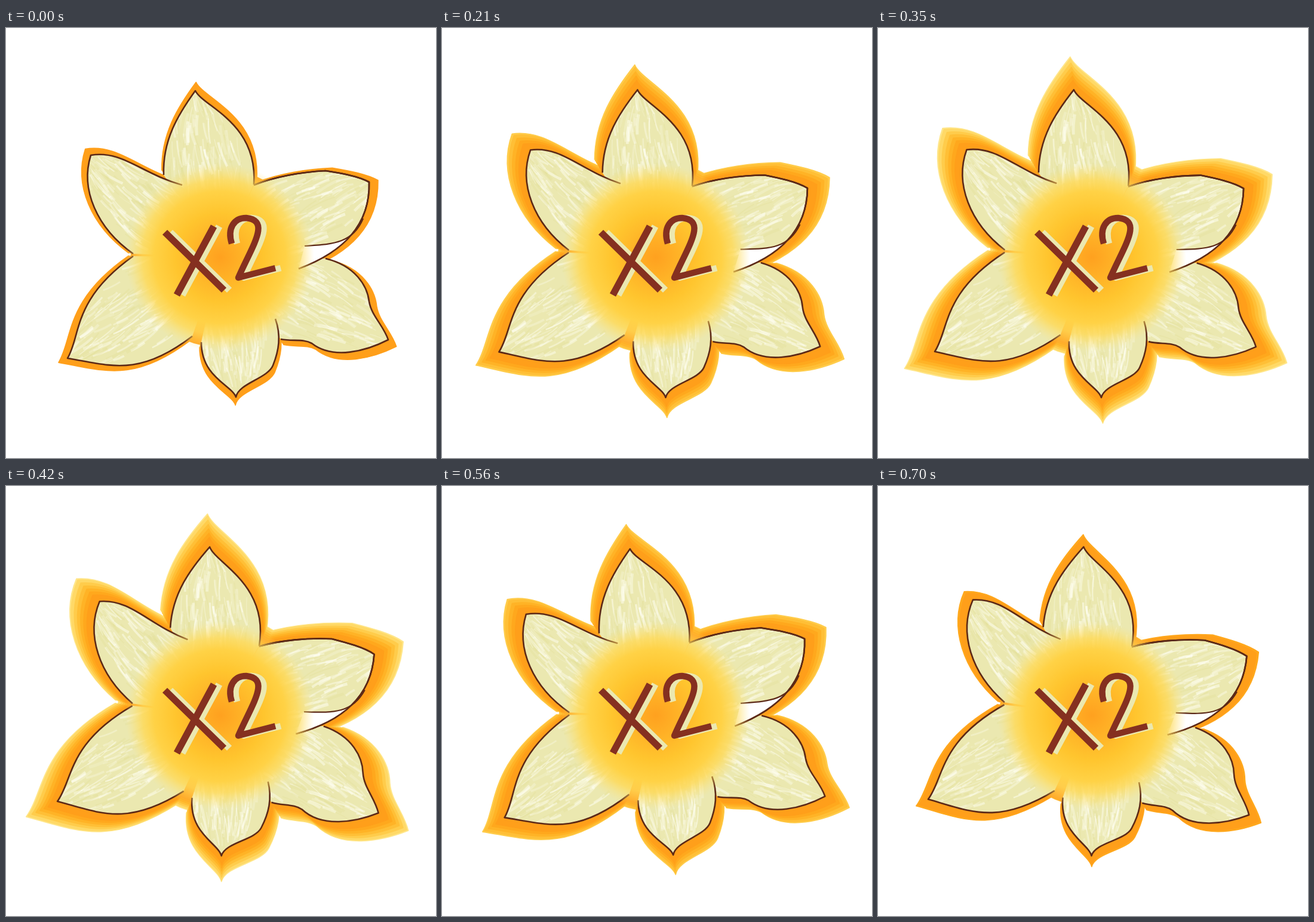
An HTML page with a canvas that plays this animation: 720 px wide and 720 px high, repeating every 770 ms.

```html
<!DOCTYPE html>
<html lang="en">
<head>
<meta charset="utf-8">
<title>Flower X2</title>
<style>
  html, body { margin: 0; height: 100%; overflow: hidden; background: #fff; }
  canvas { display: block; }
</style>
</head>
<body>
<canvas id="stage" width="720" height="720"></canvas>
<script>
const ctx = document.getElementById('stage').getContext('2d');
const STEP = 70, STEPS = 11;
const HUB = { x: 358, y: 384 };
const BROWN = '#5c2917', RED = '#853020', CREAM = '#ebe8b0';

const petals = [
  petal(317, 105, 'M264 246C262 188 288 145 317 105C330 132 422 158 415 262'),
  petal(142, 213, 'M213 378C152 335 124 270 142 213C194 204 227 244 295 263'),
  petal(640, 522, 'M535 386C585 398 605 432 608 458C612 482 632 498 640 522C603 541 548 556 512 528C498 520 480 525 460 521'),
  petal(385, 618, 'M451 487C461 515 457 540 447 565C438 587 389 595 385 618C378 598 327 585 327 526'),
  petal(103, 553, 'M213 382C110 455 126 515 103 553C175 565 222 585 312 516'),
  petal(608, 258, 'M415 263C450 249 495 241 535 239C560 243 590 248 608 258C610 330 565 375 490 403')
];
const fold = 'M598 319C580 362 545 362 500 365';
const foldLine = new Path2D(fold);
const flap = new Path2D(fold + 'L490 403C540 384 580 356 598 319Z');
const cross = new Path2D('M266 342L365 439M348 332L286 447');
const two = new Path2D('M378 361C370 335 382 318 402 318C444 322 412 365 389 418L451 402');

function petal(x, y, outline) {
  return { x, y, edge: new Path2D(outline), body: new Path2D(`${outline}L${HUB.x} ${HUB.y}Z`) };
}

// The flower sways every four steps, a little wider each time
function swayAt(step) {
  return (2.15 + 0.12 * step) * (1 - Math.cos(step * Math.PI / 2)) - 0.06 * step;
}

// The halo swells, holds and shrinks
function reachAt(step) {
  return Math.min(0.19, 0.053 + 0.031 * step, 0.42 - 0.0345 * step);
}

function randomizer(seed) {
  return () => (seed = seed * 16807 % 2147483647) / 2147483647;
}

function brush(path, color, width) {
  ctx.strokeStyle = color;
  ctx.lineWidth = width;
  ctx.stroke(path);
}

function turn(degrees) {
  ctx.translate(360, 360);
  ctx.rotate(degrees * Math.PI / 180);
  ctx.translate(-360, -360);
}

function drawSilhouette(color, grow, sway) {
  ctx.save();
  ctx.translate(367, 380 - 25 * grow);
  ctx.scale(1 + grow, 1 + grow);
  ctx.translate(-366, -378);
  turn(sway);
  ctx.fillStyle = color;
  for (const { body, edge } of petals) {
    ctx.fill(body);
    brush(edge, color, 1.5);
  }
  ctx.beginPath();
  ctx.arc(HUB.x, HUB.y, 142, 0, 7);
  ctx.fill();
  ctx.restore();
}

// Nested silhouettes from pale yellow outside to orange inside
function drawHalo(step) {
  const reach = reachAt(step), twist = Math.max(0, 0.6 - 0.2 * step);
  const last = Math.max(0, Math.ceil((reach - 0.06) / 0.024));
  for (let i = last; i >= 0; i--) {
    const t = i / 6;
    const color = `hsl(${35 + 12 * t}, 100%, ${55 + 22 * t * t}%)`;
    drawSilhouette(color, Math.min(reach, 0.06 + 0.024 * i), swayAt(step) + twist);
  }
}

// Soft strokes that fan out from the hub and gather at the tip
function drawStreaks({ x, y }, random) {
  const length = Math.hypot(x - HUB.x, y - HUB.y);
  ctx.save();
  ctx.translate(HUB.x, HUB.y);
  ctx.rotate(Math.atan2(y - HUB.y, x - HUB.x));
  for (let i = 0; i < 130; i++) {
    const along = 0.38 + 0.6 * random(), side = 2 * random() - 1;
    const heading = side * (0.55 - along) + 0.4 * (random() - 0.5);
    const size = 8 + 18 * random();
    const dx = Math.cos(heading) * size, dy = Math.sin(heading) * size;
    const px = along * length, py = side * 85 * (1.15 - along * 0.75);
    const streak = new Path2D();
    streak.moveTo(px - dx, py - dy);
    streak.quadraticCurveTo(px + dy / 8, py - dx / 8, px + dx, py + dy);
    const pale = random() < 0.7;
    brush(streak, pale ? `rgba(255,255,246,${0.15 + 0.35 * random()})` : 'rgba(222,218,145,.25)', 1 + 4 * random());
  }
  ctx.restore();
}

function drawPetals(step) {
  const random = randomizer(4127);
  ctx.save();
  turn(swayAt(step));
  for (const part of petals) {
    ctx.save();
    ctx.clip(part.body);
    ctx.fillStyle = CREAM;
    ctx.fillRect(0, 0, 720, 720);
    drawStreaks(part, random);
    ctx.restore();
    brush(part.edge, BROWN, 2.6);
  }
  ctx.fillStyle = '#fff';
  ctx.fill(flap);
  brush(foldLine, BROWN, 2.2);
  brush(petals[5].edge, BROWN, 2.6);
  ctx.restore();
}

function drawCenter() {
  const radius = 158;
  const glow = ctx.createRadialGradient(HUB.x, HUB.y, 0, HUB.x, HUB.y, radius);
  glow.addColorStop(0, '#ffa11f');
  glow.addColorStop(0.22, '#ffb126');
  glow.addColorStop(0.47, '#ffc52e');
  glow.addColorStop(0.7, '#ffd246');
  glow.addColorStop(0.82, 'rgba(255,217,86,.8)');
  glow.addColorStop(0.91, 'rgba(255,222,100,.38)');
  glow.addColorStop(1, 'rgba(255,228,130,0)');
  ctx.fillStyle = glow;
  ctx.fillRect(HUB.x - radius, HUB.y - radius, 2 * radius, 2 * radius);
}

function drawLabel(color, shift) {
  ctx.save();
  ctx.translate(shift, 0);
  brush(cross, color, 11.5);
  brush(two, color, 10.5);
  ctx.restore();
}

function draw(step) {
  ctx.fillStyle = '#fff';
  ctx.fillRect(0, 0, 720, 720);
  ctx.lineJoin = 'round';
  drawHalo(step);
  drawPetals(step);
  drawCenter();
  drawLabel(CREAM, 9);
  drawLabel(RED, 0);
}

let shown = -1;
function tick(now) {
  const step = Math.floor(now / STEP) % STEPS;
  if (step !== shown) draw(shown = step);
  requestAnimationFrame(tick);
}
tick(performance.now());
</script>
</body>
</html>
```
